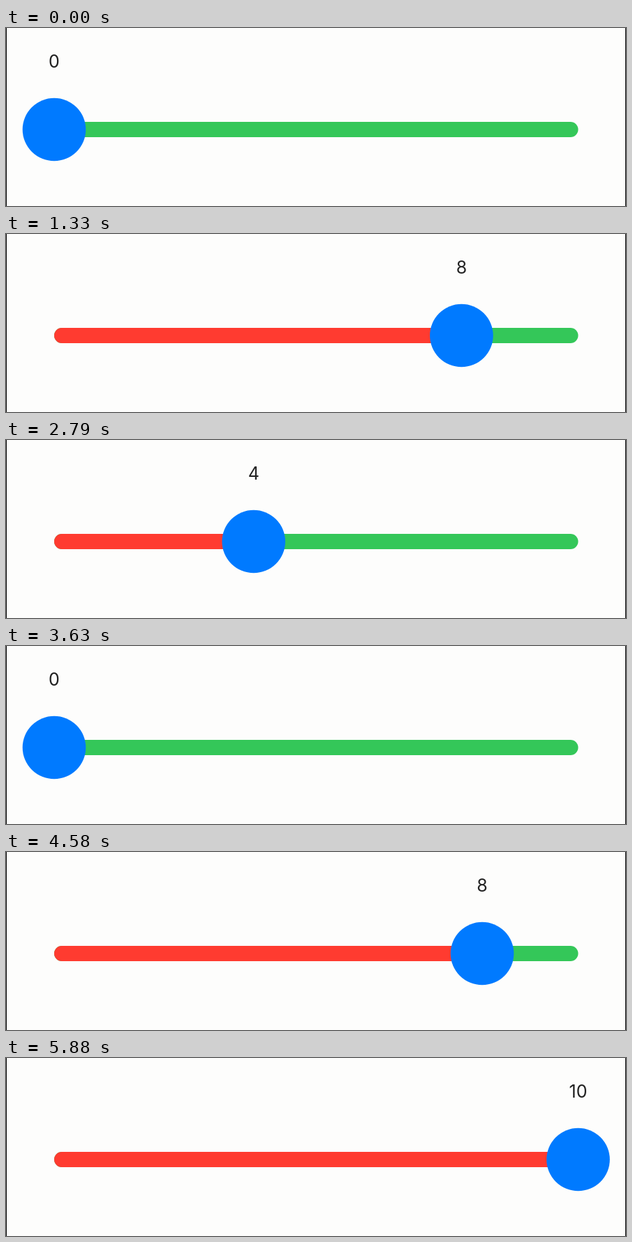
These frames come from a looping animation (888x256 px, 5930 ms). An HTML page:

```html
<!DOCTYPE html>
<html lang="en">
<head>
<meta charset="utf-8">
<title>Slider</title>
<style>
  html, body { margin: 0; width: 100%; height: 100%; overflow: hidden; background: #fdfdfc; }
  svg { display: block; width: 888px; height: 256px; }
  text { font: 25px Inter, "Open Sans", sans-serif; fill: #222; text-anchor: middle; }
</style>
</head>
<body>
<svg viewBox="0 0 888 256">
  <defs>
    <clipPath id="track"><rect x="69" y="135" width="750.5" height="22" rx="11"/></clipPath>
  </defs>
  <rect width="888" height="256" fill="#fdfdfc"/>
  <g clip-path="url(#track)">
    <rect x="69" y="135" width="751" height="22" fill="#34c759"/>
    <rect id="fill" x="69" y="135" width="0" height="22" fill="#ff3b30"/>
  </g>
  <circle id="thumb" cx="69" cy="146" r="45.3" fill="#007aff"/>
  <text id="label" x="69" y="57">0</text>
  <path d="M.5 0V256M887.5 0V256" stroke="#000"/>
</svg>
<script>
  const LOOP = 5930, STEP = 1000 / 24, LAST = 141;
  const LEFT = 69, SPAN = 750.5;

  // Each drag: start time, end time, value before, value after.
  const drags = [
    [350, 1781, 0, 1],
    [1952, 3408, 1, 0],
    [3640, 4953, 0, 1]
  ];

  const [fill, thumb, label] = ["fill", "thumb", "label"].map(id => document.getElementById(id));

  function position(t) {
    const [begin, end, from, to] = drags.findLast(drag => drag[0] <= t) || drags[0];
    const p = Math.min(1, Math.max(0, (t - begin) / (end - begin)));
    return from + (to - from) * (1 - Math.cos(Math.PI * p)) / 2;
  }

  function draw(now) {
    const t = (now - start) % LOOP;
    const tick = Math.min(LAST, Math.floor((t + 5) / STEP));
    const value = position(tick * STEP);
    const x = LEFT + value * SPAN;
    fill.setAttribute("width", x - LEFT);
    thumb.setAttribute("cx", x);
    label.setAttribute("x", x);
    label.textContent = Math.round(value * 10);
  }

  const start = performance.now();
  function loop() {
    draw(performance.now());
    requestAnimationFrame(loop);
  }
  loop();
</script>
</body>
</html>
```
